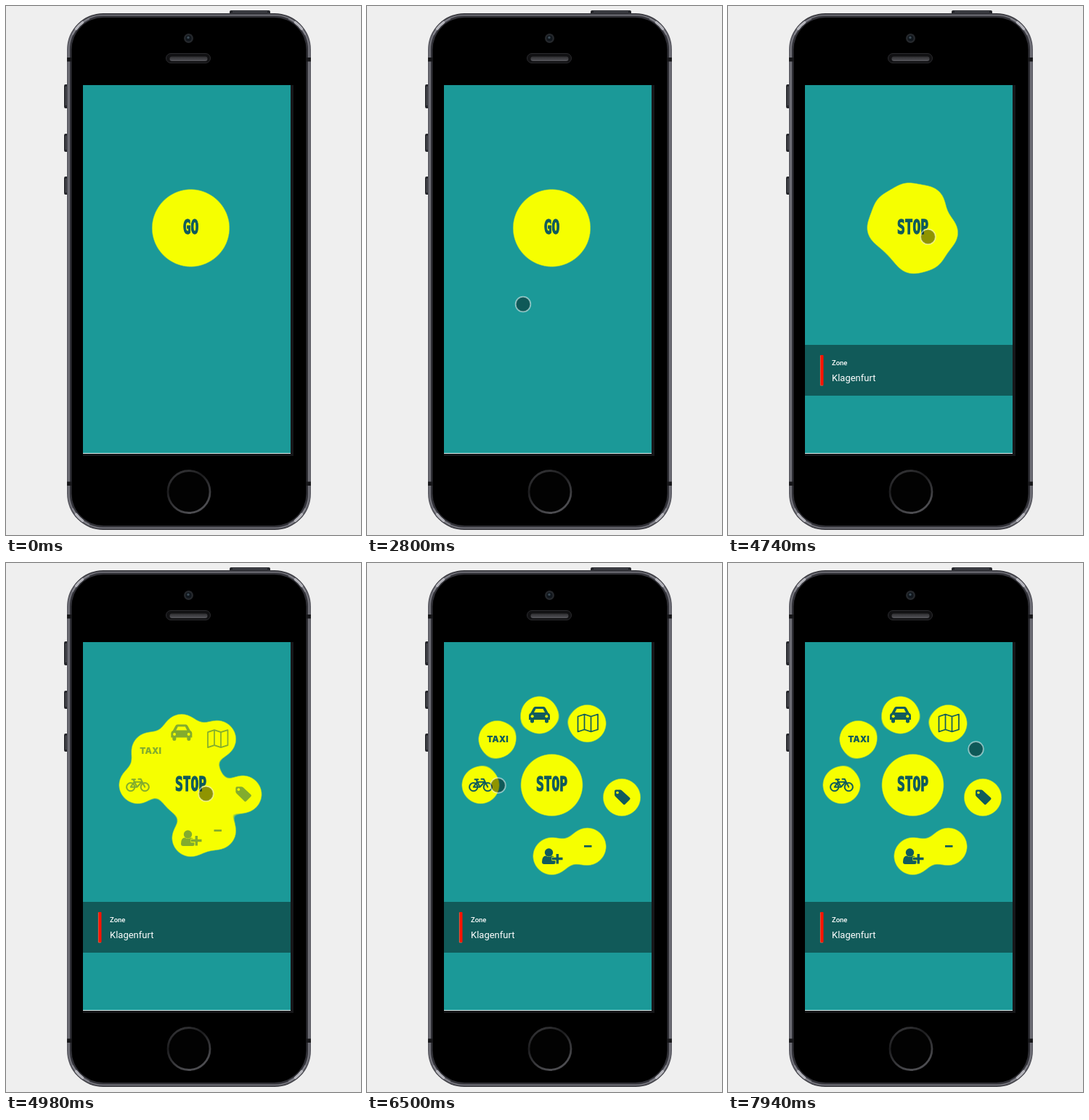
An HTML page that plays this animation: 489 px wide and 729 px high, repeating every 8000 ms.

```html
<!DOCTYPE html>
<html lang="en">
<head>
<meta charset="utf-8">
<title>Ride button</title>
<style>
  html, body { margin: 0; width: 100%; height: 100%; overflow: hidden; background: #efefef; }
  svg { display: block; width: 489px; height: 729px; }
  .ink { fill: #105b5c; }
  .line { fill: none; stroke: #105b5c; stroke-linejoin: round; stroke-linecap: round; }
  .sun { fill: #f6ff00; }
  .label {
    font: bold 27.4px "DejaVu Sans Mono", monospace; text-anchor: middle;
    stroke: #105b5c; stroke-width: 1.2; vector-effect: non-scaling-stroke;
    transform: scaleX(.656);
  }
  .taxi { font: 900 12px Inter, sans-serif; text-anchor: middle; }
  .zone { font-family: Roboto, sans-serif; fill: #fff; }
</style>
</head>
<body>
<svg viewBox="0 0 489 729" xmlns="http://www.w3.org/2000/svg">
  <defs>
    <filter id="goo" filterUnits="userSpaceOnUse" x="100" y="150" width="310" height="310" color-interpolation-filters="sRGB">
      <feGaussianBlur stdDeviation="10"/>
      <feColorMatrix values="0 0 0 0 .965  0 0 0 0 1  0 0 0 0 0  0 0 0 18 -7"/>
    </filter>
    <linearGradient id="metal" x2="0" y2="1">
      <stop offset="0" stop-color="#3a3a40"/>
      <stop offset=".06" stop-color="#5d5d65"/>
      <stop offset=".94" stop-color="#5d5d65"/>
      <stop offset="1" stop-color="#404046"/>
    </linearGradient>
    <linearGradient id="home" x1="0" y1="0" x2=".5" y2="1">
      <stop offset="0" stop-color="#3c3c3f"/>
      <stop offset=".4" stop-color="#1c1c1e"/>
      <stop offset="1" stop-color="#4c4c50"/>
    </linearGradient>
    <linearGradient id="mesh" x2="0" y2="1">
      <stop offset="0" stop-color="#2c2c2f"/>
      <stop offset="1" stop-color="#55555a"/>
    </linearGradient>
    <g id="shine" fill="none" stroke-linecap="round">
      <path d="M96.5 31.7A47 47 0 0 1 105.7 22.5" stroke="#c4c4ca" stroke-width="3.4"/>
      <path d="M92 39A47 47 0 0 1 114 18" stroke="#a0a0a8" stroke-opacity=".5" stroke-width="2.4"/>
    </g>
  </defs>

  <rect width="489" height="729" fill="#efefef"/>

  <g fill="#25262b">
    <rect x="308" y="6" width="56" height="7" rx="2"/>
    <rect x="80" y="108" width="7" height="33" rx="2"/>
    <rect x="80" y="176" width="7" height="25" rx="2"/>
    <rect x="80" y="235" width="7" height="25" rx="2"/>
  </g>
  <g fill="#55565d">
    <rect x="312" y="7.5" width="48" height="1.2"/>
    <rect x="82" y="111" width="1.2" height="26"/>
    <rect x="82" y="179" width="1.2" height="19"/>
    <rect x="82" y="238" width="1.2" height="19"/>
  </g>
  <rect x="84" y="10" width="336" height="712" rx="50" fill="url(#metal)"/>
  <rect x="86.7" y="12.7" width="330.6" height="706.6" rx="47.3" fill="none" stroke="#7c7c84" stroke-width="1.3"/>
  <rect x="88" y="14" width="328" height="704" rx="46" fill="#303036"/>
  <rect x="90.5" y="16" width="323" height="700" rx="44" fill="#000"/>
  <use href="#shine"/>
  <use href="#shine" transform="translate(504) scale(-1 1)"/>
  <use href="#shine" transform="translate(0 732) scale(1 -1)"/>
  <use href="#shine" transform="translate(504 732) scale(-1 -1)"/>
  <g fill="#17171a">
    <rect x="84" y="71" width="7" height="5.5"/>
    <rect x="413" y="71" width="7" height="5.5"/>
    <rect x="84" y="655.500" width="7" height="5.5"/>
    <rect x="413" y="655.500" width="7" height="5.5"/>
  </g>

  <circle cx="251.500" cy="44.500" r="6.500" fill="#25282c"/>
  <circle cx="251.500" cy="44.500" r="4" fill="#10161c"/>
  <circle cx="251" cy="43.500" r="1.700" fill="#3b4a55"/>
  <rect x="220.500" y="65.500" width="61" height="13" rx="6.500" fill="#111113" stroke="#2b2b2e"/>
  <rect x="225.500" y="69.500" width="52" height="6.500" rx="3.200" fill="url(#mesh)"/>
  <circle cx="252" cy="669.500" r="29" fill="#020202" stroke="url(#home)" stroke-width="2.800"/>

  <rect x="106" y="109" width="290" height="511" fill="#17171a"/>
  <rect x="106" y="109" width="286" height="508" fill="#1b9998"/>
  <rect x="106" y="616" width="286" height="1" fill="#dff0ef"/>

  <g id="zone" opacity="0">
    <rect x="106" y="467" width="286" height="70" fill="#115a59"/>
    <rect x="127" y="481" width="4.500" height="42" rx="1" fill="#fb1200"/>
    <path d="M127.300 481.500v41.500h3.500" fill="none" stroke="#d98a6a" stroke-width=".6"/>
    <text class="zone" x="143" y="495" font-size="9.500" font-weight="500">Zone</text>
    <text class="zone" x="143" y="517" font-size="13">Klagenfurt</text>
  </g>

  <g id="blobs" filter="url(#goo)"><circle id="core" cx="254.500" cy="306" r="52"/></g>

  <g transform="translate(254.500 314.300)"><text id="label" class="label ink">GO</text></g>

  <g id="icons" opacity="0">
    <g>
      <g class="line" stroke-width="2">
        <circle cx="146.700" cy="308.700" r="5.600"/>
        <circle cx="166.300" cy="308.700" r="5.600"/>
        <path d="M146.700 308.700L151.500 301.700H162L155.500 308.700ZL155.500 308.700L150.500 298.500M148.500 298.300H153M166.300 308.700L160.700 297.700H157.500"/>
      </g>
    </g>
    <g><text class="taxi ink" x="180" y="247">TAXI</text></g>
    <g>
      <path class="ink" d="M225.500 206.500L229 200Q230 198 232 198H243Q245 198 246 200L249.500 206.500Q252 207.500 252 210V216H250V218.500Q250 220.500 247.500 220.500T245 218.500V216H230V218.500Q230 220.500 227.500 220.500T225 218.500V216H223V210Q223 207.500 225.500 206.500Z"/>
      <path class="sun" d="M230 206L232.500 201H242.500L245 206Z"/>
      <circle class="sun" cx="227.700" cy="211.300" r="2"/>
      <circle class="sun" cx="247.300" cy="211.300" r="2"/>
    </g>
    <g>
      <path class="line" stroke-width="1.700" d="M290.500 211.500L299.500 208.500L308.500 211.500L318 208.500V229.500L308.500 232.500L299.500 229.500L290.500 232.500ZM299.500 208.500V229.500M308.500 211.500V232.500"/>
    </g>
    <g>
      <path class="ink" d="M341 314.500Q341 312.500 343 312.500H348.500Q350 312.500 351.300 313.700L362 323.500Q363.200 324.800 362 326L355.500 332.500Q354.200 333.700 353 332.500L342.300 322Q341 320.700 341 319.500Z"/>
      <circle class="sun" cx="345" cy="316.500" r="1.800"/>
    </g>
    <g><rect class="ink" x="299" y="389" width="10.500" height="2.700"/></g>
    <g>
      <circle class="ink" cx="250.500" cy="399" r="5.700"/>
      <path class="ink" d="M241 412Q241 403.500 246.500 403.500Q250.500 406.500 254.500 403.500Q260 403.500 260 412Q260 415 257 415H244Q241 415 241 412Z"/>
      <path d="M262.300 400V415M254.500 407.500H270" stroke="#f6ff00" stroke-width="5.600"/>
      <path d="M262.300 401V414.500M255 407.500H269.500" stroke="#105b5c" stroke-width="3.400"/>
    </g>
  </g>

  <circle id="touch" r="10.300" fill="#000" fill-opacity=".42" stroke="#fff" stroke-opacity=".5" stroke-width="1.800"/>
</svg>
<script>
const $ = id => document.getElementById(id);
const LOOP = 8000, START = 1470, TAP = 4510, REACH = 98;
const CX = 254.5, CY = 306;

// Tables are [tick, value...]; ticks are about 80 ms apart.
const entry = [[0, 391, 727], [1, 391, 722], [2, 391, 726]];
const path = [
  [9, 302, 601], [10, 295, 580], [13, 262, 457], [17, 215, 411], [18, 215, 411],
  [21, 202, 425], [22, 202, 425], [25, 224, 439], [27, 262, 443], [29, 307.5, 397],
  [31, 306, 361], [33, 295, 331], [36, 275.5, 318], [54, 275.5, 318], [57, 258, 317],
  [61, 206, 308], [64, 180.5, 306.5], [67, 184, 265], [71, 209, 232],
  [74, 232, 214], [76, 257, 219], [82, 341.5, 256.5]
];
const spread = [[38, 0], [39, 18], [42, 37], [44, 62], [46, 84], [48, 95], [49, REACH]];
const core = [[38, 52], [39, 52], [42, 49], [46, 42.5], [49, 41.6]];
const panel = [[38, 0], [41, 1]];
const fade = [[43, 0], [47, 1]];

function at(keys, n) {
  if (n <= keys[0][0]) return keys[0].slice(1);
  for (let i = 1; i < keys.length; i++) {
    const a = keys[i - 1], b = keys[i];
    if (n <= b[0]) {
      const k = (n - a[0]) / (b[0] - a[0]);
      return a.slice(1).map((v, j) => v + (b[j + 1] - v) * k);
    }
  }
  return keys[keys.length - 1].slice(1);
}

const items = [180, 220, 260, 300, 10, 60, 90].map((deg, i) => {
  const blob = $('core').cloneNode();
  blob.removeAttribute('id');
  blob.setAttribute('r', 25.5);
  $('blobs').append(blob);
  const a = deg * Math.PI / 180;
  return { blob, icon: $('icons').children[i], x: Math.cos(a), y: Math.sin(a) };
});

function tick(t) {
  return t < TAP
    ? Math.floor((t - START + 12) / 77.95)
    : 39 + Math.floor((t - TAP + 12) / 79.8);
}

function draw(n) {
  const d = at(spread, n)[0];
  $('core').setAttribute('r', at(core, n)[0]);
  for (const { blob, icon, x, y } of items) {
    blob.setAttribute('cx', CX + x * d);
    blob.setAttribute('cy', CY + y * d);
    icon.setAttribute('transform', `translate(${x * (d - REACH)} ${y * (d - REACH)})`);
  }
  $('icons').setAttribute('opacity', at(fade, n)[0]);
  $('zone').setAttribute('opacity', at(panel, n)[0]);
  $('label').textContent = n < 39 ? 'GO' : 'STOP';

  const [x, y] = at(n < 3 ? entry : path, n);
  $('touch').setAttribute('cx', x);
  $('touch').setAttribute('cy', y);
  const hidden = n < 0 || (n > 2 && n < 9);
  $('touch').setAttribute('visibility', hidden ? 'hidden' : 'visible');
}

const begin = performance.now();
let last = null;
function frame() {
  const n = Math.max(-1, tick((performance.now() - begin) % LOOP));
  if (n !== last) draw(last = n);
  requestAnimationFrame(frame);
}
frame();
</script>
</body>
</html>
```
